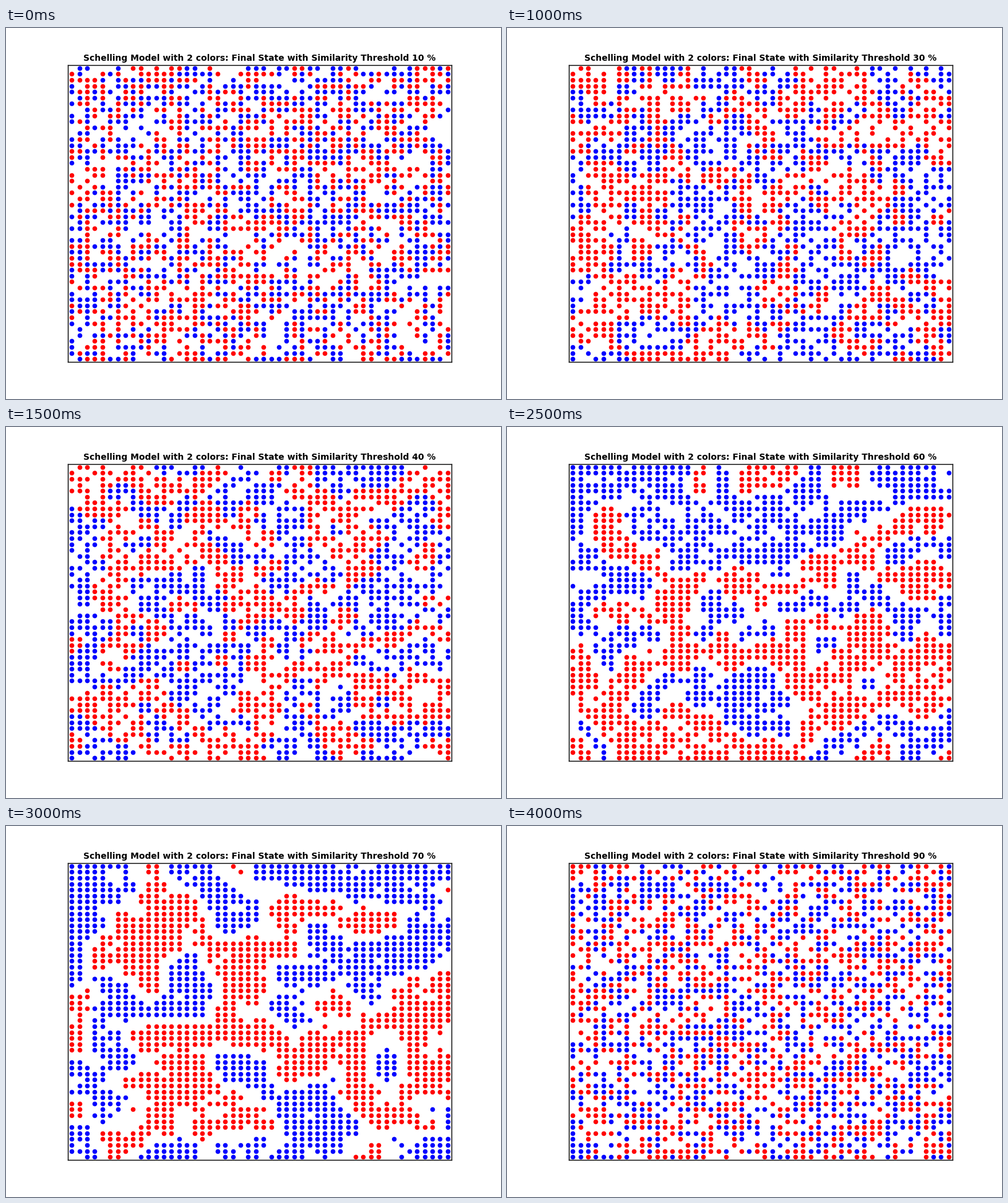
Write a matplotlib script that moves like this. It is 800 by 600 pixels and loops after 4500 ms.

```python
import random
from itertools import product

import matplotlib.pyplot as plt
import numpy as np
from matplotlib.animation import FuncAnimation

SIZE = 50
EMPTY_RATIO = 0.3
MAX_SWEEPS = 300
THRESHOLDS = range(10, 100, 10)
COLORS = ["#0000ff", "#ff0000"]
STEPS = [s for s in product((-1, 0, 1), repeat=2) if s != (0, 0)]


def unsatisfied(agents, cell, threshold):
    x, y = cell
    group = agents[cell]
    same = total = 0
    for dx, dy in STEPS:
        other = agents.get((x + dx, y + dy))
        if other is not None:
            total += 1
            same += other == group
    return total > 0 and 100 * same < threshold * total


def settle(threshold):
    """Run the Schelling model until everybody is satisfied."""
    rng = random.Random(threshold)
    cells = list(product(range(SIZE), repeat=2))
    rng.shuffle(cells)
    n_empty = int(EMPTY_RATIO * len(cells))
    empty = cells[:n_empty]
    agents = {cell: i % 2 for i, cell in enumerate(cells[n_empty:])}

    for _ in range(MAX_SWEEPS):
        moved = False
        for cell in list(agents):
            if unsatisfied(agents, cell, threshold):
                k = rng.randrange(n_empty)
                agents[empty[k]] = agents.pop(cell)
                empty[k] = cell
                moved = True
        if not moved:
            break
    return [np.array([c for c, g in agents.items() if g == group]) + 0.5
            for group in range(2)]


states = [settle(t) for t in THRESHOLDS]

fig = plt.figure(figsize=(8, 6), dpi=100, facecolor="white")
ax = fig.add_axes([0.125, 0.1, 0.775, 0.8])
ax.set(xlim=(0, SIZE), ylim=(0, SIZE), xticks=[], yticks=[])
for spine in ax.spines.values():
    spine.set_linewidth(1)
title = ax.set_title("", fontsize=10, fontweight="bold", pad=5,
                     fontfamily="DejaVu Sans")
dots = [ax.scatter([], [], s=20, color=c, linewidths=1) for c in COLORS]


def draw(i):
    for dot, points in zip(dots, states[i]):
        dot.set_offsets(points)
    title.set_text("Schelling Model with 2 colors: Final State with "
                   f"Similarity Threshold {THRESHOLDS[i]} %")
    return [*dots, title]


anim = FuncAnimation(fig, draw, frames=len(states), interval=500,
                     init_func=lambda: draw(0), repeat=True)
plt.show()
```
